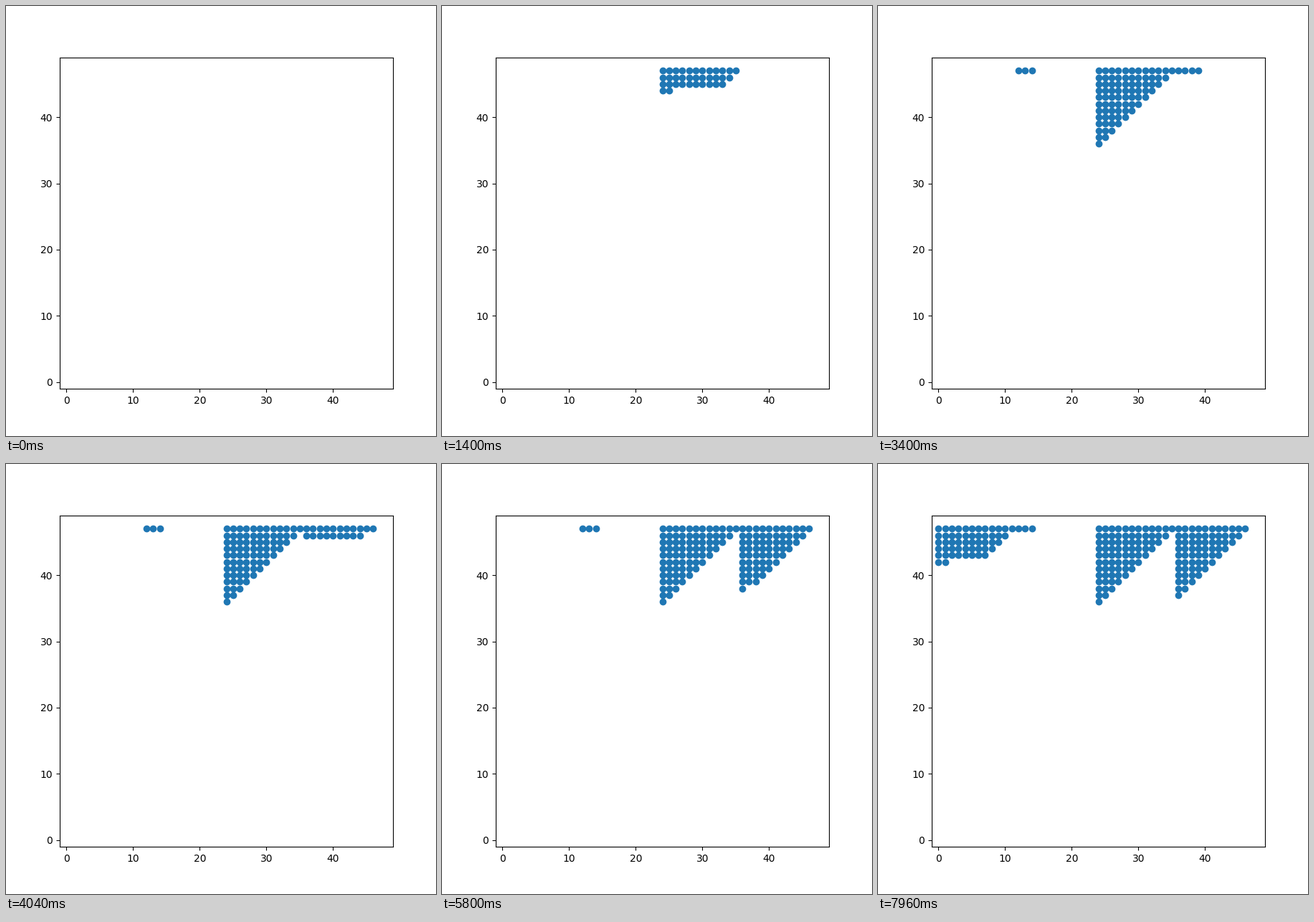
Write a matplotlib script that moves like this. It is 600 by 600 pixels and loops after 8 s.

```python
import matplotlib.pyplot as plt
from matplotlib.animation import FuncAnimation

FRAMES = 200
INTERVAL = 40
TOP = 47


def triangle(left, size):
    """Cells of a right triangle hanging from the top row, row by row."""
    return [(left + col, TOP - row)
            for row in range(size)
            for col in range(size - row)]


def strip(left, length):
    return [(left + col, TOP) for col in range(length)]


cells = triangle(24, 12) + strip(12, 3) + triangle(36, 11) + triangle(0, 12)

fig, ax = plt.subplots(figsize=(6, 6), dpi=100)
ax.set_xlim(-1, 49)
ax.set_ylim(-1, 49)
ax.set_xticks(range(0, 50, 10))
ax.set_yticks(range(0, 50, 10))
dots, = ax.plot([], [], "o", color="C0")


def init():
    dots.set_data([], [])
    return dots,


def update(frame):
    shown = cells[:frame]
    dots.set_data([x for x, _ in shown], [y for _, y in shown])
    return dots,


anim = FuncAnimation(fig, update, frames=FRAMES, init_func=init,
                     interval=INTERVAL, repeat=True, repeat_delay=0)
plt.show()
```
